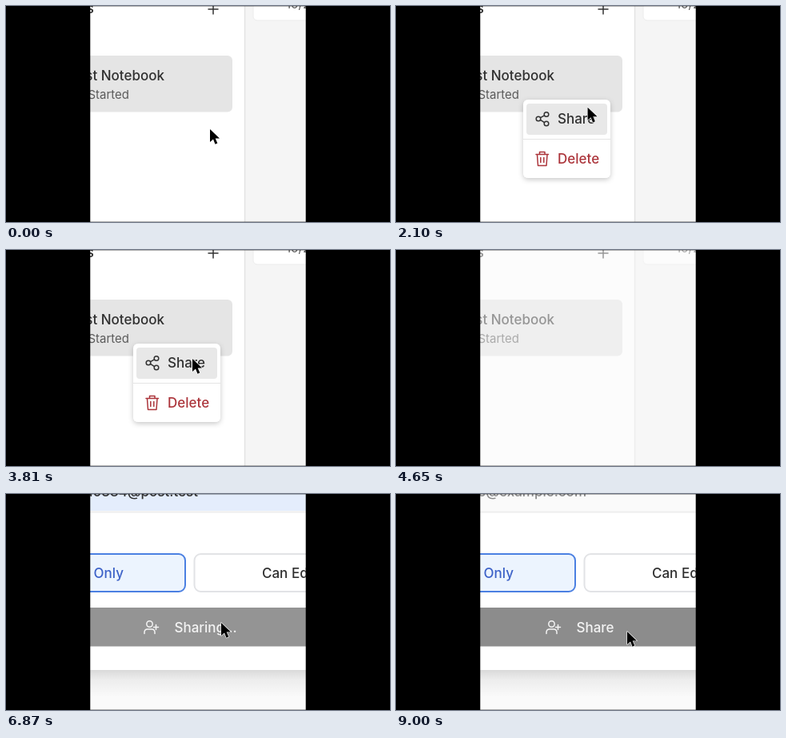
These frames come from a looping animation (480 px wide and 270 px high, 9030 ms). An HTML page:

```html
<!DOCTYPE html>
<html lang="en">
<head>
<meta charset="utf-8">
<title>Sharing a notebook</title>
<style>
html, body { margin: 0; width: 100%; height: 100%; overflow: hidden; background: #000; }
svg { display: block; width: 100%; height: 100%; }
text { font: 500 17px Inter, sans-serif; fill: #303030; }
.small { font-size: 15px; font-weight: 400; fill: #5c5c5c; }
.icon { fill: none; stroke: #333; stroke-width: 1.5; stroke-linecap: round; stroke-linejoin: round; }
.red { fill: #ac353b; }
.icon.red { fill: none; stroke: #ac353b; }
.pale { fill: #f4f4f4; }
.icon.pale { fill: none; stroke: #f4f4f4; }
</style>
</head>
<body>
<svg viewBox="0 0 480 270">
  <defs>
    <clipPath id="window"><rect x="105" width="270" height="270"/></clipPath>
    <filter id="soft" x="-20%" y="-20%" width="140%" height="150%">
      <feDropShadow dx="0" dy="2" stdDeviation="3" flood-opacity=".22"/>
    </filter>
    <linearGradient id="shade" x2="0" y2="1">
      <stop stop-opacity=".13"/>
      <stop offset=".35" stop-opacity=".055"/>
      <stop offset="1" stop-opacity="0"/>
    </linearGradient>
  </defs>
  <rect width="480" height="270"/>
  <g clip-path="url(#window)">
    <g style="filter: blur(.35px)">
      <rect x="100" y="-5" width="280" height="280" fill="#fff"/>

      <g id="page">
        <rect x="298" y="-5" width="82" height="280" fill="#f5f5f5"/>
        <path d="M298.5 -5V275" stroke="#e3e3e3" stroke-width="1.5"/>
        <rect x="309" y="-20" width="90" height="38" rx="5" fill="#fff" stroke="#ececec"/>
        <text class="small" x="350" y="3">10/24</text>
        <text x="110" y="9" text-anchor="end">Notebooks</text>
        <path class="icon" d="M253 4H265M259 -2V10"/>
        <rect x="80" y="62" width="203" height="70.5" rx="6" fill="#e5e5e5"/>
        <text x="198" y="92.500" text-anchor="end">First Notebook</text>
        <text class="small" x="154" y="116" text-anchor="end">Getting Started</text>
      </g>

      <g id="menu">
        <rect x="159" y="117" width="109" height="98" rx="6" fill="#fff" filter="url(#soft)"/>
        <rect id="hover" x="163" y="122" width="101" height="39" rx="4" fill="#e8e8e8"/>
        <path d="M159 166.500H268" stroke="#e4e4e4"/>
        <g class="icon">
          <circle cx="178" cy="141" r="2.800"/>
          <circle cx="188" cy="135.500" r="2.800"/>
          <circle cx="188" cy="147" r="2.800"/>
          <path d="M180.500 139.600L185.500 136.900M180.500 142.400L185.500 145.600"/>
        </g>
        <text x="202" y="147">Share</text>
        <path class="icon red" d="M175 185.500H190.500M179.500 185V182.500H186V185M176.500 186L177.500 199.500H188L189 186M180.800 189.500V195.500M184.800 189.500V195.500"/>
        <text class="red" x="202" y="197">Delete</text>
      </g>

      <rect id="veil" x="100" y="-5" width="280" height="280" fill="#fafafa"/>

      <g id="dialog">
        <rect x="100" y="220" width="280" height="34" fill="url(#shade)"/>
        <rect x="100" y="-5" width="280" height="225" fill="#fff"/>
        <rect id="field" x="100" y="-20" width="280" height="41"/>
        <path id="fieldEdge" d="M100 22.500H380" stroke-width="2"/>
        <text id="email" y="3" text-anchor="end"></text>
        <rect x="80" y="75" width="144" height="47" rx="8" fill="#ecf4fe" stroke="#4b80e2" stroke-width="2"/>
        <text x="147" y="104.500" text-anchor="end" style="fill:#3d62c8">View Only</text>
        <rect x="235.500" y="75" width="170" height="47" rx="8" fill="#fff" stroke="#e2e3e6" stroke-width="2"/>
        <text x="320" y="104.500">Can Edit</text>
        <rect id="button" x="100" y="142" width="280" height="48.500"/>
        <g id="action">
          <g class="icon pale">
            <circle cx="194.500" cy="162.500" r="3.700"/>
            <path d="M188 174.500V173Q188 169 192 169H197Q201 169 201 173V174.500M202.500 163.500V169.500M199.500 166.500H205.500"/>
          </g>
          <text class="pale" id="label" x="225.500" y="173"></text>
        </g>
      </g>

      <path id="cursor" d="M0 0V16L4 12.500L6.500 18.800L9.300 17.600L6.700 11.500H12Z" fill="#000" stroke="#fff" stroke-width="1.200" stroke-linejoin="round" paint-order="stroke"/>
    </g>
    <path d="M105 .5H375M105 269.500H375M105.500 0V270M374.500 0V270" stroke="#000" stroke-opacity=".3"/>
  </g>
</svg>
<script>
const LOOP = 9030;
const MENU_OPEN = 900, MENU_CLOSE = 4260, FILLED = 5040, SENT = 6480, DONE = 8340;

// Pointer stops: time, x, y
const stops = [
  [180, 255, 154], [720, 255, 105], [1680, 255, 105], [2340, 233, 136],
  [4260, 233, 136], [4530, 240, -30], [4950, 260, -30], [5400, 280, 200],
  [5760, 280, 200], [6300, 269, 161], [8100, 269, 161], [8640, 289, 172]
];

const parts = {};
document.querySelectorAll("svg [id]").forEach(el => parts[el.id] = el);

const ramp = (t, from, to) => Math.min(1, Math.max(0, (t - from) / (to - from)));
const ease = p => p * p * (3 - 2 * p);
const set = (name, attrs) => {
  for (const key in attrs) parts[name].setAttribute(key, attrs[key]);
};
const show = (name, visible) => set(name, { visibility: visible ? "visible" : "hidden" });
const write = (name, value) => {
  if (parts[name].textContent !== value) parts[name].textContent = value;
};

function pointerAt(t) {
  let [, x, y] = stops[0];
  for (let i = 1; i < stops.length; i++) {
    const [start, x0, y0] = stops[i - 1];
    const [end, x1, y1] = stops[i];
    if (t < start) break;
    const p = ease(ramp(t, start, end));
    x = x0 + (x1 - x0) * p;
    y = y0 + (y1 - y0) * p;
  }
  return [x, y];
}

function draw(t) {
  const [x, y] = pointerAt(t);
  const menuOpen = t >= MENU_OPEN && t < MENU_CLOSE;
  const filled = t >= FILLED && t < DONE;
  const sending = t >= SENT && t < DONE;
  const ready = filled && !sending;

  set("cursor", { transform: `translate(${x} ${y})` });
  show("menu", menuOpen);
  show("hover", menuOpen && y > 122 && x < 264);
  set("veil", { opacity: ramp(t, 4560, 4740) });
  set("dialog", { opacity: ramp(t, 4690, 4860) });

  set("field", { fill: filled ? "#e4edfc" : "#fafafa" });
  set("fieldEdge", { stroke: ready ? "#c9ced8" : "#ededed" });
  write("email", filled ? "mira0384@post.test" : "name@example.com");
  set("email", { x: filled ? 240 : 238 });
  parts.email.style.fill = filled ? "#303030" : "#8a8a8a";

  set("button", { fill: ready ? "#2d2d2d" : sending ? "#949494" : "#8c8c8c" });
  write("label", sending ? "Sharing..." : "Share");
  set("action", { transform: `translate(${sending ? -15 : 0} 0)` });
}

const began = performance.now();
function tick() {
  draw((performance.now() - began) % LOOP);
  requestAnimationFrame(tick);
}
tick();
</script>
</body>
</html>
```
